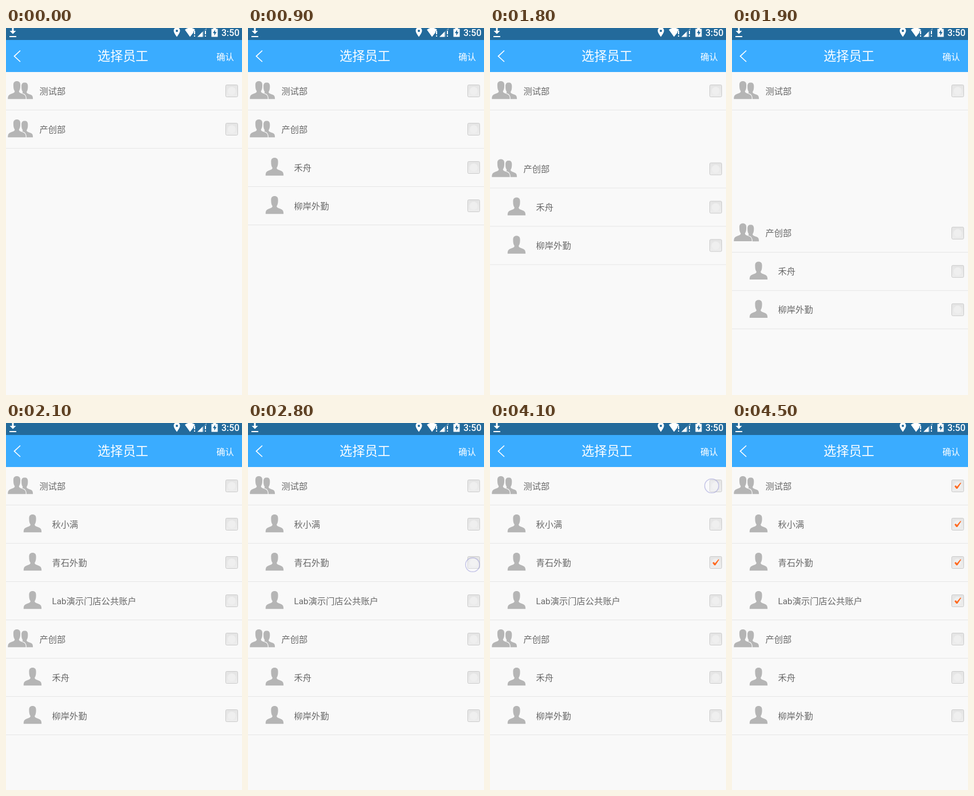
An HTML page for the animation above (8 s loop, 413x642 px).

```html
<!DOCTYPE html>
<html lang="zh-CN">
<head>
<meta charset="utf-8">
<title>选择员工</title>
<style>
  html, body { margin: 0; width: 100%; height: 100%; overflow: hidden; background: #f9f9f9; }
  svg { display: block; font-family: Roboto, "Noto Sans CJK SC", "Noto Sans CJK", sans-serif; }
</style>
</head>
<body>
<svg width="413" height="642" viewBox="0 0 413 642">
  <defs>
    <linearGradient id="boxFill" x2="0" y2="1">
      <stop stop-color="#e4e4e4"/><stop offset="1" stop-color="#ededed"/>
    </linearGradient>
    <path id="person" d="M-15.700 14.300C-15.700 9-14.500 7-11 5.700C-6.500 4-3.700 3.500-3.700 .5C-5.500-2-6.100-5-6.100-10C-6.100-15-4-17 0-17C4-17 6.100-15 6.100-10C6.100-5 5.500-2 3.700 .5C3.700 3.500 6.500 4 11 5.700C14.500 7 15.700 9 15.700 14.300Z"/>
    <g id="single"><use href="#person" x="46.500" fill="#b5b5b5"/></g>
    <g id="team" fill="#b5b5b5">
      <use href="#person" transform="translate(32.700 1.200) scale(.92)"/>
      <use href="#person" x="19" stroke="#f9f9f9" stroke-width="2.400" paint-order="stroke"/>
    </g>
    <g id="checkbox">
      <rect x="384.500" y="-10.500" width="21" height="21" rx="2" fill="url(#boxFill)" stroke="#cbcbcb"/>
      <circle cx="395" r="7" fill="#efefef"/>
    </g>
  </defs>
  <rect width="413" height="642" fill="#f9f9f9"/>
  <g id="list"></g>
  <circle id="ring" r="12.300" fill="#fafaff" fill-opacity=".5" stroke="#9696d7" stroke-width="1.600"/>

  <rect width="413" height="77" fill="#3aacff"/>
  <rect width="413" height="21" fill="#236a9b"/>
  <g fill="#fff">
    <path d="M10.500 0h3v5h4l-5.500 5.500L6.500 5h4zM6 14h12v2H6z"/>
    <path d="M299 15.500C296 11 293.500 8 293.500 4.500A5.500 5.500 0 0 1 304.500 4.500C304.500 8 302 11 299 15.500Z"/>
    <circle cx="299" cy="5" r="2" fill="#236a9b"/>
    <path d="M313 3Q322-4 331 3L328 6V8L322 15.500Z"/>
    <path d="M329 5h2v6h-2zM329 13h2v2h-2zM348 5h2v6h-2zM348 13h2v2h-2z"/>
    <path d="M351 0V4H346V15.500H335Z" opacity=".35"/>
    <path d="M344 6.500V15.500H335Z"/>
    <path d="M359.500 1.500h3V0h5v1.500h3V15.500H359.500z"/>
    <path d="M366 3L362 9H364.500V13.500L368.500 7H366Z" fill="#236a9b"/>
    <text x="377" y="14" font-size="16" font-weight="500">3:50</text>
    <text x="204.700" y="57" font-size="22.200" text-anchor="middle">选择员工</text>
    <text x="368.300" y="55.500" font-size="15.300">确认</text>
  </g>
  <path d="M25 39.500L14.500 49.300L25 59" fill="none" stroke="#fff" stroke-width="1.700"/>
</svg>
<script>
const LOOP = 8000, STEP = 100, ROW = 67, FIRST = 110;
const MOVE = 250, APPEAR = 120, CHANGE = 250;
const EXPAND = 1700, CHECK_ONE = 2900, CHECK_ALL = 4200;

// slot: final row; shift: rows travelled on EXPAND; shown: start of fade-in;
// changes: row cross-fades; ticked: when the tick starts; tapped: tick shows at once
const rows = [
  { name: "测试部", team: true, slot: 0, changes: [CHECK_ALL], ticked: CHECK_ALL, tapped: true },
  { name: "秋小满", slot: 1, shown: 1950, changes: [CHECK_ALL], ticked: CHECK_ALL },
  { name: "青石外勤", slot: 2, shown: 1950, changes: [CHECK_ONE, CHECK_ALL], ticked: CHECK_ONE, tapped: true },
  { name: "Lab演示门店公共账户", slot: 3, shown: 1950, changes: [CHECK_ALL], ticked: CHECK_ALL },
  { name: "产创部", team: true, slot: 4, shift: 3 },
  { name: "禾舟", slot: 5, shift: 3, shown: 780 },
  { name: "柳岸外勤", slot: 6, shift: 3, shown: 780 }
];

const taps = [
  { x: 193, y: 169, down: 600, up: 800 },
  { x: 159, y: 110, down: 1500, up: 1700 },
  { x: 393, y: 248, down: 2800, up: 2900 },
  { x: 388, y: 110, down: 4100, up: 4200 }
];

const list = document.getElementById("list");
const ring = document.getElementById("ring");

list.innerHTML = rows.map(({ name, team }) => `<g>
  <rect y="33" width="413" height="1" fill="#e6e6e6"/>
  <use href="#${team ? "team" : "single"}"/>
  <text x="${team ? 58.5 : 80.5}" y="5.500" font-size="15.300" fill="#686868">${name}</text>
  <use href="#checkbox"/>
  <path d="M389.300 .800L391.300 -1L393.800 1.300L399.800 -5.800L401 -4.800L394.500 5L392.500 5Z" fill="#ff6b22"/>
</g>`).join("");
rows.forEach((row, i) => {
  row.node = list.children[i];
  row.tick = row.node.lastElementChild;
});

// accelerate, then decelerate
function ease(t, start, duration) {
  const x = Math.min(1, Math.max(0, (t - start) / duration));
  return (1 - Math.cos(Math.PI * x)) / 2;
}

function drawRow(row, t) {
  const { node, tick, slot, shift = 0, shown, changes = [], ticked, tapped } = row;
  const position = slot - shift * (1 - ease(t, EXPAND, MOVE));
  let opacity = shown ? ease(t, shown, APPEAR) : 1;
  for (const start of changes) {
    const p = ease(t, start, CHANGE);
    opacity *= 1 - p * (1 - p);
  }
  node.setAttribute("transform", `translate(0 ${FIRST + ROW * position})`);
  node.setAttribute("opacity", opacity);
  const tickOpacity = !ticked || t < ticked ? 0 : tapped ? 1 : ease(t, ticked, CHANGE);
  tick.setAttribute("opacity", tickOpacity);
}

function drawRing(t) {
  const tap = taps.find(({ down, up }) => t >= down && t < up + STEP);
  ring.setAttribute("opacity", !tap ? 0 : t < tap.up ? 0.5 : 0.28);
  if (tap) ring.setAttribute("transform", `translate(${tap.x} ${tap.y})`);
}

function draw(now) {
  const t = Math.floor((now % LOOP) / STEP) * STEP;
  rows.forEach(row => drawRow(row, t));
  drawRing(t);
}

const begin = performance.now();
function frame() {
  draw(performance.now() - begin);
  requestAnimationFrame(frame);
}
frame();
</script>
</body>
</html>
```
